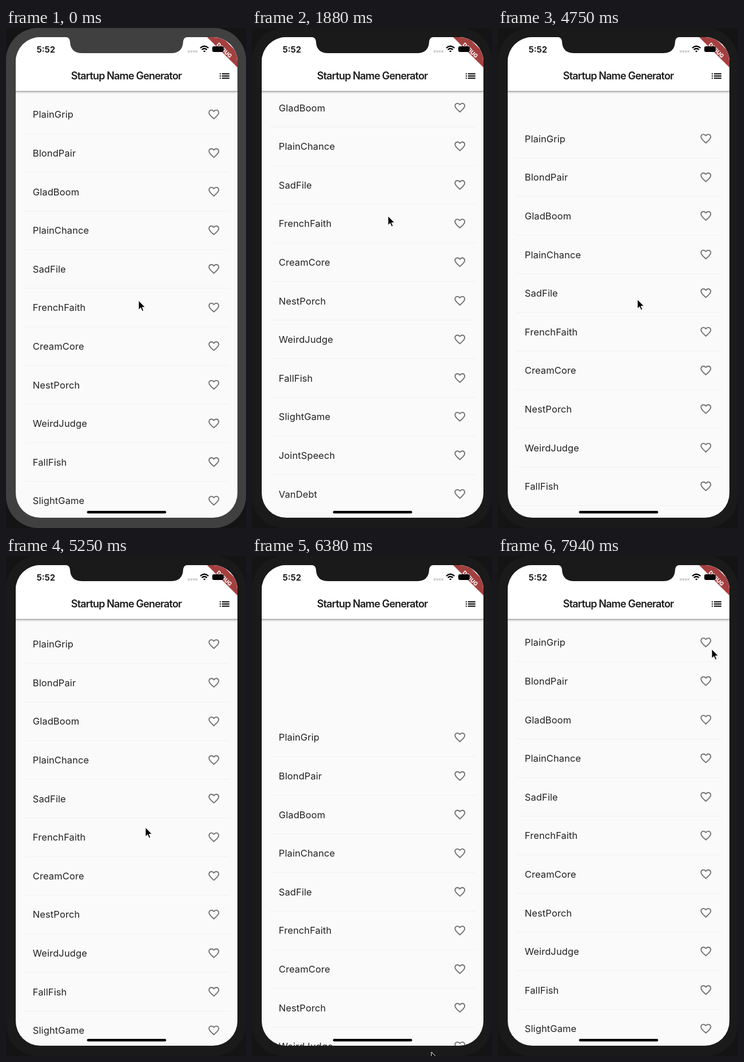
These frames come from a looping animation (420 px wide and 875 px high, 8 s). An HTML page:

```html
<!DOCTYPE html>
<html lang="en">
<head>
<meta charset="utf-8">
<title>Startup Name Generator</title>
<style>
  html, body { margin: 0; width: 100%; height: 100%; overflow: hidden; background: #141414; }
  svg { display: block; width: 420px; height: 875px; font-family: Inter, sans-serif; }
</style>
</head>
<body>
<svg viewBox="0 0 420 875">
  <defs>
    <clipPath id="screen"><rect x="17" y="16" width="388" height="841" rx="43"/></clipPath>
    <linearGradient id="shade" x2="0" y2="1">
      <stop stop-color="#a2a2a2"/><stop offset=".4" stop-color="#d6d6d6"/><stop offset="1" stop-color="#fafafa" stop-opacity="0"/>
    </linearGradient>
    <path id="heart" transform="scale(.94)" fill="#737373" d="M16.5 3c-1.74 0-3.41.81-4.5 2.09C10.91 3.81 9.24 3 7.5 3 4.42 3 2 5.42 2 8.5c0 3.78 3.4 6.86 8.55 11.54L12 21.35l1.45-1.32C18.6 15.36 22 12.28 22 8.5 22 5.42 19.58 3 16.5 3zm-4.4 15.55-.1.1-.1-.1C7.14 14.24 4 11.39 4 8.5 4 6.5 5.5 5 7.5 5c1.54 0 3.04.99 3.57 2.36h1.87C13.46 5.99 14.96 5 16.5 5c2 0 3.5 1.5 3.5 3.5 0 2.89-3.14 5.74-7.9 10.05z"/>
  </defs>

  <rect id="body" width="420" height="875" rx="56"/>
  <g clip-path="url(#screen)">
    <rect x="17" y="16" width="388" height="841" fill="#fafafa"/>
    <g id="list" fill="#222" font-size="16.5" letter-spacing=".1"></g>

    <rect x="17" y="110" width="388" height="6" fill="url(#shade)"/>
    <rect x="17" y="16" width="388" height="94" fill="#fff"/>
    <text x="210.6" y="90" text-anchor="middle" font-size="18" font-weight="600" letter-spacing="-.83" fill="#1c1c1c">Startup Name Generator</text>
    <path transform="translate(371.2 72.7) scale(.94)" fill="#050505" d="M3 13h2v-2H3zm0 4h2v-2H3zm0-8h2V7H3zm4 4h14v-2H7zm0 4h14v-2H7zM7 7v2h14V7z"/>

    <path d="M352 16h26l27 27v26z" fill="#a43f3f"/>
    <text transform="translate(382 39) rotate(45)" y="3.5" text-anchor="middle" font-size="9.5" font-weight="800" fill="#fff">DEBUG</text>
    <path d="M105 15v1q6 0 7 8q1 20 21 20h156q20 0 21-20q1-8 7-8v-1z" id="notch"/>
    <text x="53.6" y="43" font-size="15" font-weight="600" fill="#050505">5:52</text>
    <path d="M318 41h17" stroke="#ccc" stroke-width="3.4" stroke-dasharray="3.4 1.1"/>
    <g fill="none" stroke="#050505" stroke-width="2.3">
      <path d="M340 35q7-6.6 14.4 0M342.7 38q4.4-4 9 0"/>
      <path d="M347.2 42.6l-2.2-2.3q2.2-1.8 4.4 0z" fill="#050505" stroke="none"/>
    </g>
    <path d="M364 32h14a3 3 0 0 1 3 3v4a3 3 0 0 1-3 3h-14a3 3 0 0 1-3-3v-4a3 3 0 0 1 3-3zM382 35.5q2 1.5 0 3z" fill="#050505"/>
    <path d="M144 847.3h134" stroke="#050505" stroke-width="4.6" stroke-linecap="round"/>
  </g>
  <path id="cursor" d="M0 0v16.2l3.8-3.5 2.5 5.8 2.5-1.1-2.4-5.6h5.1z" fill="#000" stroke="#fff" stroke-width="1" stroke-linejoin="round"/>
</svg>
<script>
const LOOP = 8000, PITCH = 67.6, VIEW = 747;
const $ = id => document.getElementById(id);
const names = ["PlainGrip", "BlondPair", "GladBoom", "PlainChance", "SadFile", "FrenchFaith", "CreamCore",
  "NestPorch", "WeirdJudge", "FallFish", "SlightGame", "JointSpeech", "VanDebt"];

$("list").innerHTML = names.map((name, i) => {
  const y = 151.3 + i * PITCH;
  return `<text x="46.8" y="${y + 6}">${name}</text>
    <use href="#heart" x="352.5" y="${y - 11.4}"/>
    <path d="M32 ${y + 33.6}H391" stroke="#f0f0f0"/>`;
}).join("");

// keys: [time, ...values], eased between neighbours
function at(keys, t) {
  const i = keys.findIndex(k => k[0] > t);
  if (i < 0) return keys[keys.length - 1].slice(1);
  if (i === 0) return keys[0].slice(1);
  const a = keys[i - 1], b = keys[i];
  const p = (t - a[0]) / (b[0] - a[0]), e = p * p * (3 - 2 * p);
  return a.slice(1).map((v, j) => v + (b[j + 1] - v) * e);
}

const pointer = [[0, 232, 477], [400, 232, 477], [1300, 238, 329], [2100, 238, 329], [2900, 211, 249],
  [4400, 211, 249], [4730, 244, 475], [5980, 244, 475], [6370, 314, 868], [6580, 314, 868], [7350, 374, 163]];
const drag = [[0, 0], [400, 0], [1300, -147], [4400, -147], [4730, 86.5]];
const pull = [[5980, 0], [6370, 411]];

// past the top edge the list resists the finger
const resist = d => d < 0 ? d : VIEW * (1 - 1 / (1 + .52 * d / VIEW));
// overdamped return after release
const spring = (from, ms) => ms <= 0 ? from
  : from * (1.7 * Math.exp(-.00907 * ms) - .7 * Math.exp(-.022 * ms));

function scroll(t) {
  if (t < 5980) return spring(resist(at(drag, t)[0]), t - 4900);
  return spring(resist(at(pull, t)[0]), t - 6500);
}

function draw(now) {
  const t = now % LOOP;
  const [x, y] = at(pointer, t);
  $("list").setAttribute("transform", `translate(0 ${scroll(t).toFixed(2)})`);
  $("cursor").setAttribute("transform", `translate(${x.toFixed(2)} ${y.toFixed(2)})`);
  const shell = t < 60 ? "#404040" : "#1a1a1a";
  $("body").setAttribute("fill", shell);
  $("notch").setAttribute("fill", shell);
  requestAnimationFrame(draw);
}
requestAnimationFrame(draw);
</script>
</body>
</html>
```
